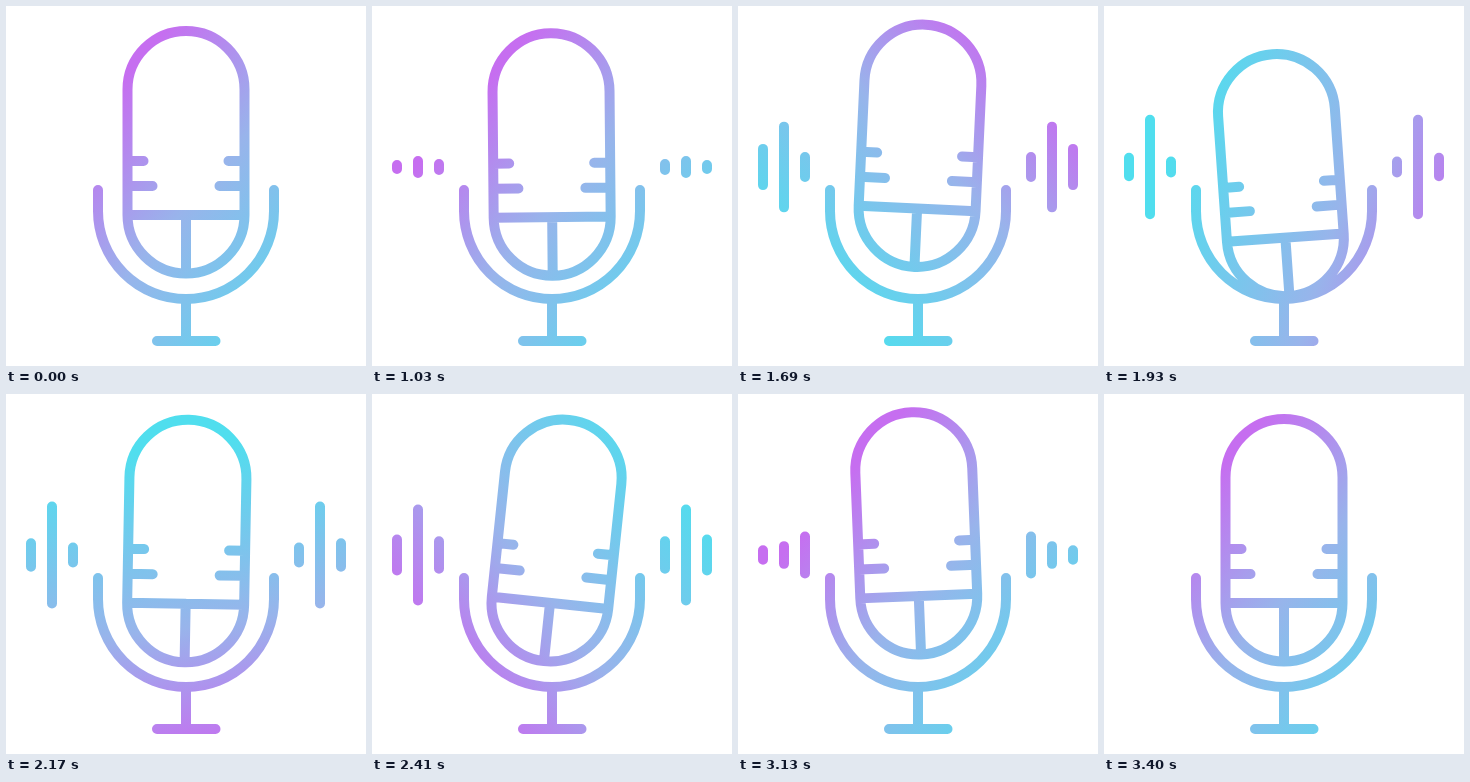
An HTML page with a canvas that plays this animation: 360 by 360 pixels, repeating every 3430 ms.

```html
<!DOCTYPE html>
<html lang="en">
<head>
<meta charset="utf-8">
<title>Microphone</title>
<style>
  html, body { margin: 0; width: 100%; height: 100%; overflow: hidden; background: #fff; }
  canvas { display: block; width: 360px; height: 360px; }
</style>
</head>
<body>
<canvas id="stage"></canvas>
<script>
const LOOP = 3430, REST = 1030, STEP = 30, LAST = 3400;
const FIRST_BEAT = 928, BEAT = 492;
const RAD = Math.PI / 180;
const canvas = document.getElementById('stage');
const ctx = canvas.getContext('2d');
const ratio = window.devicePixelRatio || 1;
canvas.width = canvas.height = 360 * ratio;

const clamp = (v, lo, hi) => Math.min(hi, Math.max(lo, v));
const ease = u => u * u * (3 - 2 * u);

// Smooth curve through one key value per beat, level at both ends
function curve(...keys) {
  const end = keys.length - 1;
  const slope = i => i > 0 && i < end ? (keys[i + 1] - keys[i - 1]) / 2 : 0;
  return beat => {
    const b = clamp(beat, 0, end), i = Math.min(end - 1, Math.floor(b));
    const u = b - i, w = 1 - u;
    return ease(w) * keys[i] + ease(u) * keys[i + 1]
      + u * w * (w * slope(i) - u * slope(i + 1));
  };
}

const swing = curve(-122, 30, 339, 595, 816, 958);
const tilt = curve(-2, 11, -4, 6, -3.5, 0);
const bars = [  // heights, from the outside in
  curve(8, 63, 29, 41, 41, 0),
  curve(18, 67, 104, 101, 64, 0),
  curve(13, 40, 21, 37, 92, 0)
];

const bob = beat => 8 + 15 * Math.cos(swing(beat) * RAD);
const hue = t => 40 + 360 * ease(clamp((t - REST) / 1970, 0, 1));

function line(x1, y1, x2, y2) {
  ctx.moveTo(x1, y1);
  ctx.lineTo(x2, y2);
}

// The colour axis turns around a point right of and below the centre
function gradient(degrees) {
  const dx = 155 * Math.cos(degrees * RAD), dy = 155 * Math.sin(degrees * RAD);
  const g = ctx.createLinearGradient(210 - dx, 204 - dy, 210 + dx, 204 + dy);
  g.addColorStop(0, '#c66ef0');
  g.addColorStop(0.42, '#98b4eb');
  g.addColorStop(1, '#50deee');
  return g;
}

function addStand() {
  line(92, 184, 92, 205);
  ctx.arc(180, 205, 88, Math.PI, 0, true);
  ctx.lineTo(268, 184);
  line(180, 293, 180, 335);
  line(151, 335, 209.5, 335);
}

function addCapsule(dy, degrees) {
  const r = 58.5, left = 180 - r, right = 180 + r;
  ctx.save();
  ctx.translate(180, 190 + dy);
  ctx.rotate(degrees * RAD);
  ctx.translate(-180, -190);
  ctx.moveTo(left, 209);
  ctx.arc(180, 83.5, r, Math.PI, 0);
  ctx.arc(180, 209, r, 0, Math.PI);
  ctx.closePath();
  line(left, 209, right, 209);
  line(180, 209, 180, 267);
  for (const [y, length] of [[155, 16], [180, 25]]) {
    line(left, y, left + length, y);
    line(right, y, right - length, y);
  }
  ctx.restore();
}

function addBars(beat) {
  bars.forEach((height, i) => {
    const h = height(beat);
    if (h < 8) return;
    const half = Math.max(0.5, h / 2 - 5), x = 25 + 21 * i;
    for (const cx of [x, 360 - x]) line(cx, 161 - half, cx, 161 + half);
  });
}

function draw(t) {
  const moving = t >= REST && t < LAST;
  const beat = (t - FIRST_BEAT) / BEAT;
  ctx.setTransform(ratio, 0, 0, ratio, 0, 0);
  ctx.fillStyle = '#fff';
  ctx.fillRect(0, 0, 360, 360);
  ctx.strokeStyle = gradient(hue(t));
  ctx.lineWidth = 10;
  ctx.lineCap = ctx.lineJoin = 'round';
  ctx.beginPath();
  addStand();
  addCapsule(moving ? bob(beat) : 0, moving ? tilt(beat) : 0);
  if (moving) addBars(beat);
  ctx.stroke();
}

const start = performance.now();
function tick() {
  const t = (performance.now() - start) % LOOP;
  draw(t < REST ? 0 : REST + STEP * Math.floor((t - REST) / STEP));
  requestAnimationFrame(tick);
}
tick();
</script>
</body>
</html>
```
